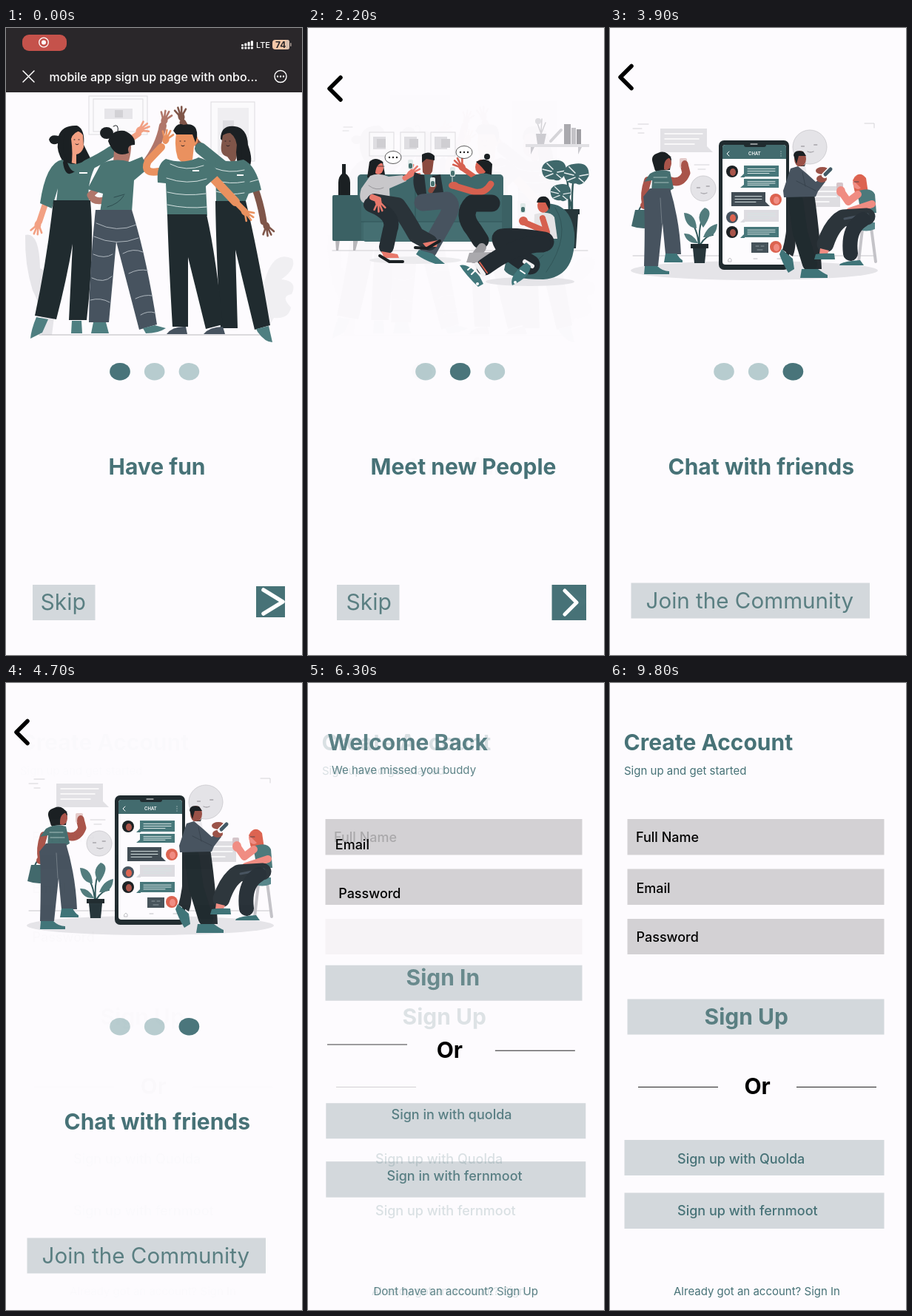
Animation, 400 px wide and 848 px high, one loop 9.9 s. Source, as an HTML page:

```html
<!DOCTYPE html>
<html lang="en">
<head>
<meta charset="utf-8">
<title>Sign up onboarding</title>
<style>
html,body{margin:0;width:100%;height:100%;overflow:hidden;background:#fdfbfe}
svg{display:block;width:400px;height:848px;font-family:Inter,sans-serif}
</style>
</head>
<body>
<svg id="stage" viewBox="0 0 400 848"></svg>
<script>
const TEAL = '#477277', SHIRT = '#4a7573', DARK = '#202b2f', HAIR = '#1b2023', JEAN = '#47535f',
      PALE = '#e6e5e9', FIELD = '#d3d1d4', BTN = '#d3d8dc', LABEL = '#5a7f82';

// markup helpers
const fill = (c, d) => `<path d="${d}" fill="${c}"/>`;
const line = (c, w, d) => `<path d="${d}" fill="none" stroke="${c}" stroke-width="${w}" stroke-linecap="round" stroke-linejoin="round"/>`;
const oval = (c, x, y, rx, ry = rx) => `<ellipse cx="${x}" cy="${y}" rx="${rx}" ry="${ry}" fill="${c}"/>`;
const box = (c, x, y, w, h, r = 0) => `<rect x="${x}" y="${y}" width="${w}" height="${h}" rx="${r}" fill="${c}"/>`;
const text = (s, size, weight, c, x = 0, y = 0) => `<text x="${x}" y="${y}" font-size="${size}" font-weight="${weight}" fill="${c}">${s}</text>`;
const frame = (x, y, w, h) => `<rect x="${x}" y="${y}" width="${w}" height="${h}" fill="#fbfafc" stroke="#dddce0"/>`;
const face = (x, y) => line('#2a2024', 1, `M${x - 3} ${y}h1M${x + 3} ${y}h1M${x - 1} ${y + 6}q2 2 4 0`);
const hand = (c, x, y, deg) => `<g transform="translate(${x} ${y}) rotate(${deg})">` +
  oval(c, 0, 0, 4.5, 6) + line(c, 2.6, 'M-3 -3L-7 -10M-1 -4L-2 -13M1 -4L3 -13M3 -3L8 -9') + '</g>';

function highFive() {
  const A = '#f2a083', B = '#b0766a', C = '#ea915f', D = '#7f5549', shoe = '#4f7f81';
  return frame(112, 92, 79, 52) + frame(118, 96, 67, 44) + box(PALE, 133, 109, 38, 14) + box('#d2d1d5', 147, 111, 11, 10) +
    frame(277, 100, 59, 80) + box('#efeef1', 286, 108, 42, 64) + box('#dedde1', 293, 125, 15, 25) +
    fill(PALE, 'M26 280Q45 275 46 325Q60 330 55 350Q70 345 69 360L62 415H48Q50 380 36 355Q25 320 26 280Z') +
    fill('#f0eff2', 'M350 412Q342 370 350 340Q362 300 387 312Q393 325 372 340Q395 342 386 360Q370 362 385 378Q382 394 362 392Z') +
    line('#b9b8bc', 1, 'M45 415H345') +
    // far right friend
    line(D, 9, 'M268 165Q250 150 239 128') + hand(D, 237, 120, -12) +
    line(SHIRT, 16, 'M294 188L263 163') +
    fill(HAIR, 'M290 150Q290 131 309 133Q326 135 327 158Q335 180 328 189Q322 196 314 190L311 172Z') +
    fill(D, 'M293 145Q303 134 313 148L311 168Q313 181 305 182L299 174Q289 172 291 158Z') + face(299, 153) +
    fill(HAIR, 'M291 147Q297 134 309 137Q321 144 318 178L312 165Q313 149 303 142Q296 142 291 147Z') +
    line(D, 9, 'M336 215Q345 240 348 262') + hand(D, 352, 268, 160) +
    fill(SHIRT, 'M283 177Q300 183 321 178Q338 186 345 219L328 224L323 236H284Z') +
    line('#dbe5e4', 1, 'M283 190q18 7 39 2M284 206q18 6 38 2M284 221q18 6 38 2M330 208l11-3') + box('#fff', 312, 198, 9, 2) +
    fill(DARK, 'M283 234H324Q340 300 357 402L336 408L310 300L313 406H290Q284 310 283 234Z') +
    fill(shoe, 'M338 407L355 403L360 425Q350 425 340 411Z') + fill(JEAN, 'M267 414Q275 404 293 404L296 414Z') +
    // left friend
    fill(HAIR, 'M58 151Q60 143 71 146Q76 131 96 132Q107 137 105 158L116 180Q121 199 100 201Q84 201 77 181Q68 166 70 156Q61 160 58 151Z') +
    fill(A, 'M83 142Q97 135 104 145L105 161Q102 170 95 171L95 184L80 180L85 166Z') + face(95, 151) +
    fill(HAIR, 'M79 143Q86 130 102 139Q91 140 88 150Q91 171 88 188Q73 177 79 143Z') +
    line(A, 8, 'M145 167L179 143') + hand(A, 181, 138, 57) + line(SHIRT, 15, 'M109 186Q130 176 143 167') +
    line(A, 8, 'M54 235L45 262') + hand(A, 43, 266, 190) +
    fill(SHIRT, 'M76 178Q91 190 109 178L120 188Q108 215 113 235H68L70 217L62 244L46 237Q54 182 76 178Z') +
    box('#fff', 99, 195, 11, 2) +
    fill(HAIR, 'M80 171Q85 194 93 194Q80 204 77 182Z') +
    fill(DARK, 'M64 233H114Q120 300 109 395H85L90 292Q82 340 68 394L39 389Q56 310 64 233Z') +
    fill(shoe, 'M41 391L57 394L49 412L33 420Q34 408 41 391ZM89 396H102L103 413H88Z') +
    // friend seen from behind
    line(B, 10, 'M187 185Q207 160 212 132') + hand(B, 214, 125, 15) +
    line(B, 9, 'M128 213L114 226Q118 236 132 233') +
    oval(HAIR, 136, 142, 9, 8) + fill(B, 'M147 150H169V163Q168 175 165 182H145Z') +
    fill(HAIR, 'M138 153Q143 137 160 139Q176 146 174 158Q162 158 166 169Q147 177 138 153Z') +
    line(HAIR, 1, 'M145 133q8-5 6 8') +
    fill(SHIRT, 'M128 184Q146 175 167 181L184 174L192 190L173 206L170 249H127L131 224L110 218Z') +
    line('#2e4d50', 1, 'M137 242q15-4 22-15M146 229l14-4') +
    fill(JEAN, 'M121 246H170Q190 310 204 401L180 408L149 289L139 398H112Q113 318 121 246Z') +
    line('#b9c1c8', .9, 'M122 264q28 14 54 2M119 282q30 14 60 2M118 306q15 7 26 0M158 305q14-8 27-2M116 338q16 8 27-2M166 332q13-7 26-4M114 368q14-4 26 3M175 366q12-6 23-4M182 388q10-6 19-3') +
    fill(shoe, 'M118 398H135L139 413H115ZM185 406L201 402L216 406Q206 413 189 413Z') +
    // right centre friend
    line(C, 10, 'M207 194Q184 198 192 180L210 161') + hand(C, 216, 151, 15) +
    fill(C, 'M230 143Q243 136 257 144Q263 154 254 160L252 178Q241 188 232 176Q227 160 230 143Z') +
    fill(HAIR, 'M226 139Q231 127 240 131Q260 127 258 148L256 155L252 144Q241 144 230 144Z') + face(238, 153) +
    line(C, 12, 'M278 201L310 235') + line(C, 8, 'M307 232L322 247') + hand(C, 323, 249, 130) +
    fill(SHIRT, 'M216 177Q240 185 260 175Q280 180 288 198L270 214L272 254H218L216 210L205 209Q203 184 216 177Z') +
    line('#d6e2e1', 1, 'M222 184q21 11 45 2M217 203q28 10 54 1M218 222q24 6 52 2M218 239q27 6 53 3') + box('#fff', 252, 192, 9, 2) +
    fill(DARK, 'M218 252H271Q284 310 293 401L270 407L246 310L246 404H225Q220 320 218 252Z') +
    fill(JEAN, 'M217 414Q225 403 243 404L245 414Z');
}

function sofa() {
  const A = '#e8796c', B = '#8b4a3f', C = '#d6604f', S = '#3f686b', shoe = '#41777b';
  const leaf = (x, y, s) => `<g transform="translate(${x} ${y}) scale(${s})">` +
    fill(S, 'M0 -14Q18 -16 17 2Q9 17 0 12Q-16 13 -16 -3Q-14 -13 0 -14Z') + line('#e9eff0', 1.5, 'M-15 -2L-3 1M-11 8L-1 4M16 0L5 2M10 10L4 5M-9 -10L-1 -2') + '</g>';
  const bubble = (x, y) => `<ellipse cx="${x}" cy="${y}" rx="11" ry="8.5" fill="#fff" stroke="#333" stroke-width=".8"/>` + line('#222', 2.4, `M${x - 5} ${y}h0M${x} ${y}h0M${x + 5} ${y}h0`);
  const glass = (x, y) => box('#dfe9e8', x - 3, y - 7, 7, 13, 2) + box('#47716f', x - 2, y - 2, 5, 7, 2);
  return [83, 125, 166].map((x, i) => frame(x, 141, 33, 32) + box('#dedde1', x + 5, 147, 17, 17) + box('#cfced2', x + 10 + i * 2, 150, 12, 12)).join('') +
    line('#e0dfe3', 1, 'M48 134h12M47 139h8') +
    box('#e1e0e4', 294, 157, 86, 4) + fill('#cccbd0', 'M301 161v10l5-10ZM365 161v10l5-10ZM308 143h14l-3 14h-9Z') +
    line('#d4d3d7', 1.5, 'M315 143L309 126M315 143L321 128M315 140L316 123') + oval('#deDde1', 311, 126, 4) +
    box('#aaa9ae', 346, 130, 9, 27) + box('#c4c3c7', 356, 135, 6, 22) + box('#9e9da2', 363, 137, 6, 20) + line('#d5d4d8', 4, 'M328 153L342 138') +
    line('#d0cfd3', 1, 'M33 301H378') + oval('#ecebee', 145, 314, 62, 5) + oval('#e5e4e8', 300, 343, 60, 6) +
    // plant
    line('#33585a', 2.5, 'M357 246Q356 195 365 189M353 246Q352 175 335 186M356 246Q355 225 341 221') + leaf(332, 193, 1) + leaf(362, 198, 1.03) + leaf(341, 223, .84) +
    fill('#26363a', 'M346 245H367V252H365L362 298H350Z') +
    // sofa
    fill('#b7b6ba', 'M37 286h6l-2 15h-3ZM61 286h7l-4 15h-3Z') + box(S, 67, 198, 197, 90, 5) + box('#456f72', 75, 262, 190, 27, 3) +
    box('#3b6164', 33, 226, 39, 62, 2) + box('#3b6164', 262, 226, 14, 66, 2) + line('#315558', 1, 'M72 262H262M145 202V286') +
    fill(HAIR, 'M46 184h5v13q6 4 6 12v17H41v-17q0-8 5-12Z') +
    // woman on the left
    fill(HAIR, 'M83 181Q91 173 101 181L104 198Q94 207 80 202Z') + oval(A, 95, 189, 7, 9) + fill(HAIR, 'M84 184Q91 173 102 182Q92 183 91 196L84 201Z') + line('#333', .8, 'M94 187h9') +
    fill('#c8c7ca', 'M84 200Q95 195 109 201L128 199L133 207L110 217L111 237H76Q67 233 72 217Z') + line('#98979b', 1, 'M82 213q10 8 20 3') +
    line(A, 7, 'M131 203L139 198') + hand(A, 139, 197, 50) + glass(138, 185) +
    // man in the middle
    fill(B, 'M154 177Q162 172 170 178L168 194L162 203L155 195Z') + fill(HAIR, 'M154 182V171Q164 165 171 173V179L160 177Z') +
    fill('#272f34', 'M144 195Q160 203 179 198L184 228L154 234Q138 217 144 195Z') + fill(S, 'M157 198H168V224H160Z') + line(B, 7, 'M166 220L170 213') + glass(168, 209) +
    line(JEAN, 23, 'M155 236L188 233Q198 240 185 261L163 300') + fill(shoe, 'M150 300L168 305L185 319H172Q157 314 146 306Z') +
    line('#2a3339', 22, 'M90 235L121 240Q132 255 146 280L164 290') + line('#252e34', 20, 'M85 239Q119 253 111 273L106 296') +
    fill(A, 'M155 291L176 287L174 296H159ZM99 302L121 306L123 311H103Z') + line(HAIR, 4, 'M145 297L161 298L178 288M97 308L110 316L128 316') + hand(A, 95, 235, 165) + line(A, 8, 'M87 229L95 232') +
    // woman on the right
    oval(HAIR, 242, 174, 4) + fill(HAIR, 'M228 181Q240 173 249 184L248 200L239 203Z') + oval(C, 234, 188, 8, 10) + fill(HAIR, 'M227 181Q240 174 246 184L243 199Q236 188 227 181Z') +
    line(C, 7, 'M226 202L209 190') + hand(C, 208, 188, -40) +
    fill(S, 'M226 199Q239 193 253 201Q262 216 254 235H222L226 216L217 204Z') + line(C, 9, 'M247 211Q239 224 226 222L199 214') + glass(195, 195) + line('#cfd4d5', 1, 'M195 200V214') + oval(C, 197, 213, 7, 5) +
    line('#222a2f', 23, 'M248 237L222 237Q207 252 224 273L233 287') + line('#9d9ca0', 12, 'M235 297L224 312') + fill('#aaa9ad', 'M218 304L247 303Q248 319 214 317Z') +
    // beanbag
    fill('#3c6669', 'M316 238Q354 233 360 277Q363 337 318 340Q272 340 265 327Q271 288 312 285Q329 272 316 238Z') + line('#315558', 1, 'M334 243Q357 279 322 330M281 330Q306 320 318 307') +
    oval(C, 318, 240, 8, 10) + fill(HAIR, 'M309 236Q311 226 321 228Q330 232 326 246L321 236Z') + fill('#e4e3e5', 'M306 252Q327 246 333 256L337 285H305Z') +
    line(C, 8, 'M317 257L323 276L295 264') + oval(C, 291, 261, 6) + glass(290, 244) +
    line('#232b31', 27, 'M319 289Q277 282 262 285Q263 298 300 320') + line('#232b31', 23, 'M316 292Q281 292 239 323') +
    line('#f0eff1', 6, 'M228 320L237 333M293 316L303 322') + line(C, 2, 'M232 317L242 331') +
    fill(shoe, 'M205 321Q217 318 232 336L237 346L230 350Q214 335 205 321ZM276 348Q271 335 295 317L301 322Q300 337 276 348Z') + line('#fff', 2, 'M216 327l5-4M221 333l5-5M287 328l6 4') +
    oval('#fff', 229, 346, 2) + oval('#fff', 280, 344, 2) + bubble(115, 175) + bubble(211, 168);
}

function chat() {
  const A = '#a9544a', B = '#9a5147', C = '#f08c82', red = '#dc6350', shoe = '#3f7478';
  const smile = (x, y, r) => `<circle cx="${x}" cy="${y}" r="${r}" fill="#e4e3e7" stroke="#d0cfd3"/>` + line('#a6a5aa', 1.3, `M${x - r / 2} ${y - 1}h4M${x + r / 4} ${y - 3}h4M${x - 3} ${y + 6}q4 2 8 0`);
  const note = (c, x, y, w, h) => box(c, x, y, w, h) + line('#d7e3e3', 1, `M${x + 5} ${y + h * .3}h${w - 10}M${x + 5} ${y + h * .5}h${w - 10}M${x + 5} ${y + h * .7}h${w - 18}`);
  const head = (x, y, skin, hair) => oval(hair, x, y, 8) + oval(skin, x + 1, y + 1, 4, 5);
  return line('#d5d4d8', 1, 'M38 130h14M31 136h12M38 142h8M344 129h13v6M114 185h20M119 191h10') +
    fill('#e2e1e5', 'M68 136H131V160L139 168H68Z') + line('#fff', 1.3, 'M74 143h51M74 150h46M74 157h40') +
    smile(126, 217, 17) + smile(270, 161, 23) + fill('#dedde1', 'M269 214H311V242H262L269 233Z') + line('#fff', 1.3, 'M276 221h30M276 228h30M276 235h20') +
    oval('#e5e4e8', 195, 328, 167, 13) + line('#c7c6ca', 1, 'M31 308H359') +
    // potted plant
    line('#315a5c', 2, 'M121 294Q119 265 128 252M120 294Q118 270 108 262M122 293Q130 280 139 280') +
    fill('#527c7d', 'M128 243Q142 247 126 270Q114 254 128 243ZM100 250Q116 251 117 271Q102 270 100 250ZM145 265Q144 284 126 283Q132 267 145 265ZM100 278Q112 277 119 291Q104 292 100 278Z') +
    box(DARK, 109, 292, 24, 6) + fill('#27363b', 'M112 298H130L128 318H114Z') +
    // phone
    box(DARK, 147, 152, 95, 175, 7) + box('#fdfcfe', 152, 158, 86, 162, 4) + fill('#426b6e', 'M152 177V162Q152 158 156 158H234Q238 158 238 162V177Z') + box(DARK, 181, 154, 30, 7, 3) +
    text('CHAT', 6, 600, '#fff', 187, 172) + line('#fff', 1, 'M161 167l-3 3l3 3M231 167v0M231 170v0M231 173v0M190 157h9') +
    note('#47777a', 181, 186, 47, 15) + note('#47777a', 181, 204, 47, 12) + fill('#47777a', 'M182 196v6h-6ZM182 211v5h-6Z') + note('#414c54', 164, 222, 46, 19) + fill('#414c54', 'M209 234l7 7h-8Z') +
    note('#dddce1', 181, 246, 47, 16) + fill('#dddce1', 'M182 257v6h-6Z') + note('#47777a', 181, 269, 47, 14) + fill('#47777a', 'M182 278v6h-6Z') +
    box('#46535a', 191, 290, 23, 14) + line('#8d999e', 1, 'M197 295h4M204 295h4M199 300h7') +
    head(165, 194, A, HAIR) + head(224, 232, C, red) + head(165, 256, red, JEAN) + head(165, 276, A, HAIR) + head(224, 296, C, red) +
    line('#bebdc2', 1, 'M160 313l2-2l2 2v3h-4ZM194 312h5M226 312h5') +
    // woman with bag
    fill(HAIR, 'M58 183Q54 172 65 169Q76 164 83 177L81 192L61 193Z') + oval(A, 76, 183, 7, 9) + fill(HAIR, 'M62 174Q73 164 83 175Q72 176 73 191L62 194Z') +
    line(A, 10, 'M51 206Q45 224 48 238') + line(A, 11, 'M83 207Q97 211 103 196L101 188') + box('#e4cac9', 94, 176, 10, 13, 2) + oval(A, 101, 186, 5, 7) +
    line('#30585b', 2, 'M38 250Q44 230 53 249') + fill('#41686b', 'M34 246H57L63 268Q45 274 29 268Z') + oval(A, 46, 240, 5) +
    fill('#466f70', 'M54 197Q66 190 81 194L86 217L81 220H56L57 206L46 208Z') + line('#a5bebb', 1, 'M59 202h18M60 209h19') +
    fill(JEAN, 'M54 217H81Q94 260 96 306L75 306L71 264L65 322H46Q48 250 45 228Z') + line('#727d86', 1, 'M70 264L68 230') +
    fill(shoe, 'M47 322H64Q71 329 80 329V333H46ZM75 305H90Q94 312 98 314V317H73Z') +
    // walking man
    fill('#252d32', 'M239 224H276Q284 280 286 326H265L250 282Q252 296 247 309L233 300Q242 269 239 224Z') + line(DARK, 20, 'M251 234L257 277L270 319') +
    oval(B, 257, 177, 8, 11) + fill(HAIR, 'M248 172Q249 164 261 167L265 173L255 173L252 184ZM254 184Q261 190 265 182L262 189Z') + fill('#eceaee', 'M252 187h12l2 10Z') +
    fill(JEAN, 'M244 190L254 187L266 197L278 208L287 202L291 208L281 221L278 228L235 229L234 220Z') + line('#38434e', 1, 'M252 207L278 220M260 195L264 214') +
    oval(B, 286, 204, 7, 5) + oval(B, 287, 193, 9, 5) + line('#fff', 8, 'M290 199L299 190') + line('#435a66', 5, 'M291 198L298 191') +
    fill(shoe, 'M232 299L247 312L249 326L241 331Q233 318 229 306ZM259 326H281Q289 332 294 334V338H257Z') +
    // seated woman
    line('#c4c3c8', 4, 'M341 272L336 316M353 270L359 316') + fill('#57868a', 'M334 263L358 263V272Q343 278 334 270Z') +
    fill(red, 'M330 202Q338 193 346 203Q348 216 350 231L339 236Q326 220 330 202Z') + oval(C, 335, 209, 7, 9) + fill(red, 'M328 206Q335 194 345 204L347 226Q339 215 328 206Z') + line('#584548', 1, 'M330 208h6') +
    fill('#4c797b', 'M334 221Q353 214 358 225L360 250H339Z') + line(C, 10, 'M335 225L322 235L313 222') + line(C, 10, 'M354 238L324 248') + box('#d5c5ca', 306, 209, 9, 13, 2) + oval(C, 312, 221, 6, 7) +
    line('#2c353b', 23, 'M347 255L315 257Q300 265 291 292') + line(JEAN, 3, 'M348 252L317 258') + line('#283138', 20, 'M342 259Q321 271 325 305') +
    fill(C, 'M284 298l12 3l-3 6l-10-2Z') + fill(shoe, 'M278 306Q287 304 303 305L304 313H276ZM311 319Q318 315 338 314L343 321H310Z');
}

const header = box('#2a272a', 0, 0, 400, 87) + box('#c5524b', 22, 9, 60, 22, 9) +
  '<circle cx="51" cy="19.5" r="6.3" fill="none" stroke="#fff" stroke-width="1.3"/>' + oval('#fff', 51, 19.5, 3) +
  [0, 1, 2, 3].map(i => box('#fff', 318 + i * 4.3, 22 - i * 1.6, 3, 2.5 + i * 1.6, 1) + box('#fff', 318 + i * 4.3, 25.5, 3, 3, 1)).join('') +
  text('LTE', 11, 500, '#fff', 338, 27) + box('#f3c7a7', 360, 16, 23, 13, 4) + box('#d8bfae', 378, 16, 5, 13, 3) + text('74', 12, 700, '#2a272a', 364, 27) + box('#a89b93', 384, 20, 1.6, 5, 1) +
  line('#fff', 1.5, 'M23 58L38 73M38 58L23 73') + text('mobile app sign up page with onbo...', 16, 500, '#fff', 58.5, 71.5) +
  '<circle cx="371" cy="65.5" r="8" fill="none" stroke="#fff" stroke-width="1.4"/>' + line('#fff', 2.4, 'M367 65.5h0M371 65.5h0M375 65.5h0');

const stage = document.getElementById('stage'), items = [];
function add(markup, at) {
  const g = document.createElementNS('http://www.w3.org/2000/svg', 'g');
  g.innerHTML = markup;
  stage.append(g);
  items.push({g, at, rect: Object.values(at)[0].length > 2});
}
const HOME = [0, 0];
const label = (s, size, weight, c, at) => add(text(s, size, weight, c), at);
const rect = (c, at) => add(box(c, 0, 0, 1, 1), at);

// pages: 0-2 onboarding, 3 sign up, 4 sign in
[highFive, sofa, chat].forEach((draw, i) => add(draw(), {[i]: HOME}));
const row = {0: 140, 1: 145, 2: 140};
for (let i = 0; i < 3; i++) {
  const spot = p => [row[p] + 14 + i * 46.7, 464.7];
  add(oval('#b7cccf', 0, 0, 13.8, 11.8), {0: spot(0), 1: spot(1), 2: spot(2)});
  add(oval('#49747a', 0, 0, 13.8, 11.8), {[i]: spot(i)});
}
add(line('#000', 5.5, 'M18 3L3 18L18 33'), {1: [26, 64], 2: [11, 48.5]});
label('Have fun', 30, 700, TEAL, {0: [138.5, 604]});
label('Meet new People', 30, 700, TEAL, {1: [84.5, 604]});
label('Chat with friends', 30, 700, TEAL, {2: [78.5, 604]});
rect(BTN, {0: [36, 753, 84.5, 48], 1: [39, 753, 84.5, 48], 2: [28.5, 750.5, 322.5, 48]});
label('Skip', 30, 400, LABEL, {0: [46.5, 786.5], 1: [51.5, 786.5]});
label('Join the Community', 29.6, 400, LABEL, {2: [48.5, 784.5]});
rect(TEAL, {0: [338, 755, 39, 42], 1: [329.5, 753, 46.5, 48]});
add(line('#fff', 5.5, 'M348 760L374 776L348 792'), {0: HOME});
add(line('#fff', 5, 'M347 761L363 777L347 793'), {1: HOME});

label('Create Account', 30, 700, TEAL, {3: [18.5, 91]});
label('Welcome Back', 30, 700, TEAL, {4: [26.5, 91]});
label('Sign up and get started', 15, 400, TEAL, {3: [19, 124]});
label('We have missed you buddy', 15, 400, TEAL, {4: [32, 122.5]});
for (const y of [184, 251.5]) rect(FIELD, {3: [23.5, y, 347, 48.5], 4: [23.5, y, 347, 48.5]});
rect(FIELD, {3: [23.5, 319, 347, 48]});
label('Full Name', 18, 500, '#000', {3: [35, 215]});
label('Email', 18, 500, '#000', {3: [35.5, 284], 4: [37, 216]});
label('Password', 18, 500, '#000', {3: [35.5, 349.5], 4: [42, 283]});
rect(BTN, {3: [23.5, 427.5, 347, 48], 4: [23.5, 375, 347, 48]});
label('Sign Up', 30, 700, LABEL, {3: [127.5, 462]});
label('Sign In', 30, 700, LABEL, {4: [132.5, 409]});
label('Or', 30, 700, '#000', {3: [181.5, 555.5], 4: [172.5, 499.5]});
rect('#222', {3: [38, 546, 108, 1]});
rect('#222', {4: [26, 488.5, 108, 1]});
rect('#222', {3: [252, 546, 108, 1], 4: [253, 489.5, 108, 1]});
rect(BTN, {3: [19.5, 618, 351, 48], 4: [25, 561, 351, 48]});
rect(BTN, {3: [19.5, 689.5, 351, 48.5], 4: [25, 641, 351, 48.5]});
label('Sign up with Quolda', 18, 500, TEAL, {3: [91, 650]});
label('Sign in with quolda', 18, 500, TEAL, {4: [112.5, 590]});
label('Sign up with fernmoot', 18, 500, TEAL, {3: [91, 720]});
label('Sign in with fernmoot', 18, 500, TEAL, {4: [106.5, 673]});
label('Already got an account? Sign In', 15, 400, TEAL, {3: [86, 828]});
label('Dont have an account? Sign Up', 15, 400, TEAL, {4: [88.5, 828]});
add(header, {0: HOME});
const bar = items[items.length - 1].g;

const LOOP = 9900, SPAN = 300;
const moves = [[1920, 0, 1], [3400, 1, 2], [4700, 2, 3], [6108, 3, 4], [7608, 4, 3]];
const clamp = v => Math.min(1, Math.max(0, v));
const ease = v => 1 - (1 - v) ** 2;

function render(t) {
  let [start, from, to] = moves[0];
  for (const m of moves) if (t >= m[0]) [start, from, to] = m;
  const p = ease(clamp((t - start) / SPAN));
  for (const {g, at, rect} of items) {
    const a = at[from], b = at[to];
    const alpha = a && b ? 1 : a ? (1 - p) ** .8 : b ? p : 0;
    g.style.display = alpha ? '' : 'none';
    if (!alpha) continue;
    const [x, y, w, h] = a && b ? a.map((v, i) => v + (b[i] - v) * p) : a || b;
    g.setAttribute('opacity', alpha);
    g.setAttribute('transform', `translate(${x} ${y})` + (rect ? ` scale(${w} ${h})` : ''));
  }
  // browser bar slides away
  const up = ease(clamp((t - 60) / 440));
  bar.setAttribute('transform', `translate(0 ${-88 * up})`);
  if (up === 1) bar.style.display = 'none';
}

const begin = performance.now();
function tick() {
  render((performance.now() - begin) % LOOP);
  requestAnimationFrame(tick);
}
tick();
</script>
</body>
</html>
```
